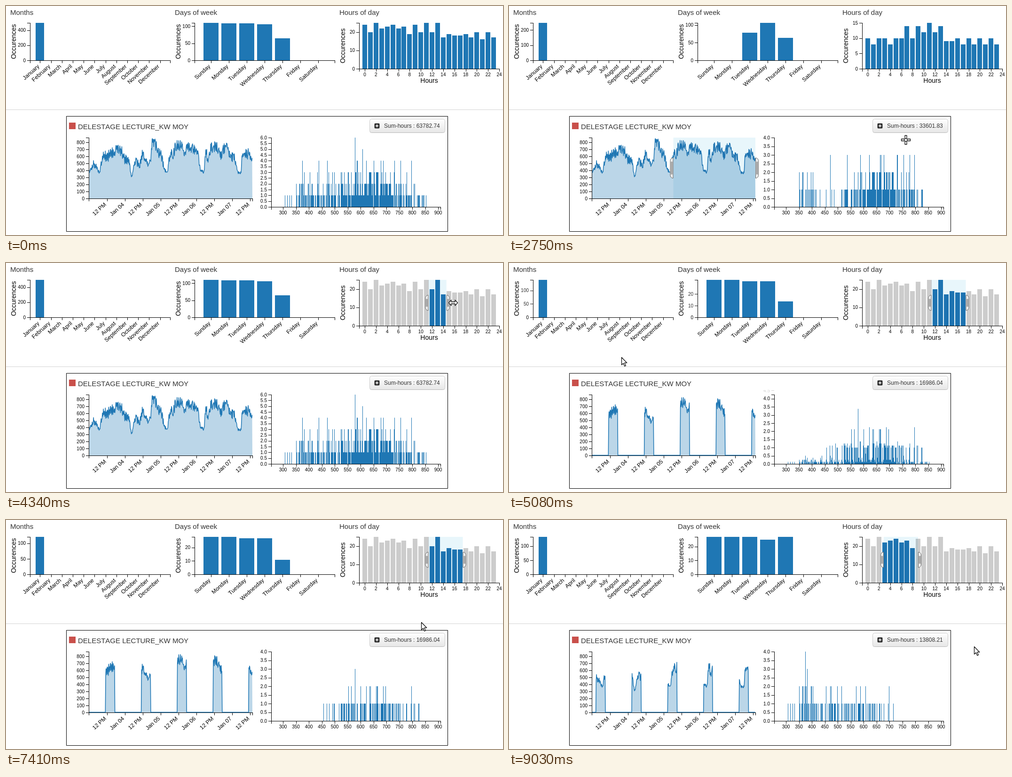
These frames come from a looping animation (1057x489 px, 9050 ms). An HTML page with a canvas:

```html
<!DOCTYPE html>
<html lang="en">
<head>
<meta charset="utf-8">
<title>Load dashboard</title>
<style>
html, body { margin: 0; width: 100%; height: 100%; overflow: hidden; background: #fff; }
canvas { display: block; }
</style>
</head>
<body>
<canvas id="stage" width="1057" height="489"></canvas>
<script>
const ctx = document.getElementById('stage').getContext('2d');
const LOOP = 9050, FADE = 500, DAY_PX = 76.1;
const BLUE = '#1f77b4', GREY = '#ccc', INK = '#333';
const FONT = '"Liberation Sans", Arial, sans-serif';
const MONTHS = ['January', 'February', 'March', 'April', 'May', 'June', 'July',
  'August', 'September', 'October', 'November', 'December'];
const DAYS = ['Sunday', 'Monday', 'Tuesday', 'Wednesday', 'Thursday', 'Friday', 'Saturday'];

const lerp = (a, b, k) => a + (b - a) * k;
const clamp = (v, lo, hi) => Math.max(lo, Math.min(hi, v));
const cubicInOut = k => k < .5 ? 4 * k ** 3 : 1 - 4 * (1 - k) ** 3;
const range = (from, to, step) =>
  Array.from({ length: Math.floor((to - from) / step + 1e-6) + 1 }, (_, i) => from + i * step);

function random(seed) {
  return () => {
    seed = seed + 0x6D2B79F5 | 0;
    let r = Math.imul(seed ^ seed >>> 15, 1 | seed);
    r = r + Math.imul(r ^ r >>> 7, 61 | r) ^ r;
    return ((r ^ r >>> 14) >>> 0) / 4294967296;
  };
}

// Values between [time, ...values] key points.
function between(keys, t) {
  const next = keys.findIndex(p => p[0] > t);
  if (next <= 0) return keys[next ? keys.length - 1 : 0].slice(1);
  const a = keys[next - 1], b = keys[next], k = (t - a[0]) / (b[0] - a[0]);
  return a.slice(1).map((v, i) => lerp(v, b[i + 1], k));
}

// Turning points of the load curve, in pixels; fine noise goes on top.
const TURNS = [
  [177, 355], [186, 338], [192, 344], [199, 357], [205, 320], [215, 322], [229, 311], [235, 306],
  [247, 310], [249, 325], [262, 333], [267, 366], [270, 356], [273, 330], [284, 340], [291, 315],
  [302, 342], [308, 328], [311, 286], [316, 290], [323, 310], [331, 320], [337, 350], [343, 356],
  [350, 310], [355, 326], [360, 299], [375, 297], [379, 324], [385, 299], [408, 313], [414, 352],
  [421, 355], [425, 310], [430, 328], [435, 303], [447, 299], [457, 320], [466, 300], [486, 327],
  [494, 357], [500, 355], [502, 318], [516, 315], [524, 326]];
const noise = random(5);
const SERIES = range(177, 524, .7).map(x => {
  const [y] = between(TURNS, x), swing = clamp((362 - y) * .35, 3, 12);
  return [x, 282 + Math.abs(y + (noise() * 2 - 1) * swing - 282)];
});

const hourMask = start => x => x >= start && (x - start) % DAY_PX <= 19.4;

// How often each load value occurs among the kept samples.
function histogram(keep, max) {
  const counts = {};
  for (const [x, y] of SERIES) {
    const v = Math.round((411 - y) / .15);
    if (keep(x)) counts[v] = Math.min(max, (counts[v] || 0) + 1);
  }
  return counts;
}

function scale(max, count) {
  const raw = max / count, base = 10 ** Math.floor(Math.log10(raw)), err = base / raw;
  const step = base * (err <= .15 ? 10 : err <= .35 ? 5 : err <= .75 ? 2 : 1);
  return { max, ticks: range(0, max, step) };
}

function state(sum, days, hours, histMax, keep, mask) {
  return {
    sum, days, hours, mask,
    hist: histogram(keep, histMax),
    monthScale: scale(days.reduce((a, b) => a + b), 3),
    dayScale: scale(Math.max(...days), 3),
    hourScale: scale(Math.max(...hours), 3),
    histScale: scale(histMax, 10)
  };
}

const HOURS = [24, 20, 25, 22, 23, 24, 22, 23, 19, 24, 20, 25, 20, 25, 17, 19, 18, 18, 19, 17, 20, 16, 20, 17];
const LATE_HOURS = [10, 8, 10, 10, 8, 10, 10, 14, 10, 14, 12, 15, 12, 14, 9, 9, 10, 8, 10, 8, 10, 8, 10, 8];
const inNoon = hourMask(212), inDawn = hourMask(185.4);
const all = state('63782.74', [110, 108, 108, 106, 65], HOURS, 6, () => true);
const late = state('33601.83', [0, 0, 78, 106, 64], LATE_HOURS, 4, x => x > 349.5);
const noon = state('16986.04', [28, 28, 27, 27, 11], HOURS, 4, inNoon, inNoon);
const dawn = state('13808.21', [27, 27, 27, 25, 27], HOURS, 4, inDawn, inDawn);
const CHANGES = [[-FADE, all], [2010, late], [3240, all], [4758, noon], [8510, dawn]];

const PATH = [
  [260, 905, 238], [600, 760, 290], [1150, 439, 333], [1310, 378, 350], [1390, 349, 346],
  [1760, 656, 330], [2010, 656, 330], [2400, 850, 300], [2790, 843, 284], [2910, 252, 338],
  [3240, 243, 339], [4140, 890, 88], [4340, 951, 85], [4500, 985, 90], [5080, 239, 201],
  [5960, 606, 355], [6050, 606, 355], [6640, 860, 193], [6920, 859, 308], [7120, 963, 297],
  [7410, 883, 218], [7740, 883, 218], [7920, 930, 99], [8140, 930, 99], [8260, 828.5, 99],
  [9030, 989, 270]];
const pointer = t => between(PATH, t);

function lineBrush(t) {
  if (t < 1390 || t >= 2910) return null;
  return [349.5, t < 1760 ? clamp(pointer(t)[0], 349.5, 524) : 524];
}

function hourBrush(t) {
  if (t < 4180) return null;
  if (t < 4500) return [898.5, clamp(pointer(t - 48)[0], 898.5, 971.5)];
  const dx = t < 8140 ? 0 : t < 8260 ? pointer(t)[0] - 930 : -101.5;
  return [898.5 + dx, 971.5 + dx];
}

function box(x, y, w, h, color) {
  ctx.fillStyle = color;
  ctx.fillRect(x, y, w, h);
}

function bar(x, base, w, h, color = BLUE) {
  const left = Math.round(x), top = Math.round(base - h);
  box(left, top, Math.round(x + w) - left, base - top, color);
}

function text(str, x, y, size, align = 'left', color = '#000', angle = 0) {
  ctx.save();
  ctx.translate(x, y);
  ctx.rotate(angle * Math.PI / 180);
  ctx.font = size + 'px ' + FONT;
  ctx.fontKerning = 'none';
  ctx.textAlign = align;
  ctx.fillStyle = color;
  ctx.fillText(str, 0, 0);
  ctx.restore();
}

function yAxis(x, top, bottom, from, to, k, label = String) {
  const height = bottom - top;
  box(x, top, 1, height + 1, '#000');
  box(x - 6, top, 6, 1, '#000');
  box(x - 6, bottom, 6, 1, '#000');
  ctx.save();
  ctx.beginPath();
  ctx.rect(x - 45, top - 10, 60, height + 30);
  ctx.clip();
  for (const v of new Set([...from.ticks, ...to.ticks])) {
    const y = bottom - height * lerp(v / from.max, v / to.max, k);
    ctx.globalAlpha = lerp(+from.ticks.includes(v), +to.ticks.includes(v), k);
    box(x - 6, Math.round(y), 6, 1, '#000');
    text(label(v), x - 9, y + 3.6, 10, 'right');
  }
  ctx.restore();
}

function xAxis(x0, x1, y, ticks) {
  box(x0, y, x1 - x0 + 1, 1, '#000');
  for (const x of [x0, x1, ...ticks]) box(Math.round(x), y, 1, 6, '#000');
}

const title = (str, x, y) => text(str, x, y, 15, 'left', INK);
const slanted = (str, x, y) => text(str, x - .5, y + 14, 12, 'right', '#000', -42);
const sideTitle = (x, y) => text('Occurences', x, y, 14, 'center', '#000', -90);

function handle(x, top, height, east) {
  const s = east ? 1 : -1, e = +east, a = height / 3, b = 2 * a;
  const p = new Path2D(
    `M${.5 * s},${a}A6,6 0 0 ${e} ${6.5 * s},${a + 6}V${b - 6}A6,6 0 0 ${e} ${.5 * s},${b}Z` +
    `M${2.5 * s},${a + 8}V${b - 8}M${4.5 * s},${a + 8}V${b - 8}`);
  ctx.save();
  ctx.translate(x, top);
  ctx.fillStyle = '#eee';
  ctx.strokeStyle = '#666';
  ctx.lineWidth = 1;
  ctx.fill(p);
  ctx.stroke(p);
  ctx.restore();
}

function drawBrush(extent, top, height) {
  if (!extent) return;
  const [a, b] = extent;
  ctx.globalCompositeOperation = 'multiply';
  box(a, top, b - a, height, '#e8f6fb');
  ctx.globalCompositeOperation = 'source-over';
  handle(a, top, height, false);
  handle(b, top, height, true);
}

function drawMonths(from, to, k) {
  const centers = MONTHS.map((_, i) => 72.3 + 23.2 * i);
  title('Months', 9, 19);
  sideTitle(21, 76);
  bar(62.6, 116, 18.8, 80);
  xAxis(51, 349, 116, centers);
  MONTHS.forEach((m, i) => slanted(m, centers[i], 116));
  yAxis(51, 36, 116, from.monthScale, to.monthScale, k);
}

function drawDays(from, to, k) {
  const centers = DAYS.map((_, i) => 436 + 38 * i);
  const share = (s, i) => (s.days[i] || 0) / s.dayScale.max;
  title('Days of week', 359, 19);
  sideTitle(371, 76);
  DAYS.forEach((d, i) => {
    bar(centers[i] - 16, 116, 32, 80 * lerp(share(from, i), share(to, i), k));
    slanted(d, centers[i], 116);
  });
  xAxis(401, 699, 116, centers);
  yAxis(401, 36, 116, from.dayScale, to.dayScale, k);
}

function drawHours(from, to, k, extent) {
  const xOf = h => 763 + 11.92 * h;
  const share = (s, i) => s.hours[i] / s.hourScale.max;
  title('Hours of day', 709, 19);
  sideTitle(721, 85);
  for (let i = 0; i < 24; i++) {
    const x = xOf(i), chosen = !extent || (x >= extent[0] && x < extent[1]);
    bar(x - 5, 134, 10, 98 * lerp(share(from, i), share(to, i), k), chosen ? BLUE : GREY);
  }
  const ticks = range(0, 24, 2);
  xAxis(751, 1049, 134, ticks.map(xOf));
  for (const h of ticks) text(h, xOf(h), 150, 10, 'center');
  text('Hours', 900, 164, 14, 'center');
  yAxis(751, 36, 134, from.hourScale, to.hourScale, k);
  drawBrush(extent, 36, 98);
}

function drawLoad(mask, extent) {
  const ticks = range(0, 8, 1).map(i => 214.5 + DAY_PX / 2 * i);
  const loads = scale(867, 10);
  xAxis(176, 524, 411, ticks);
  ticks.forEach((x, i) => slanted(i % 2 ? 'Jan 0' + (4 + (i - 1) / 2) : '12 PM', x, 411));
  yAxis(176, 281, 411, loads, loads, 1);

  const line = new Path2D();
  for (const [x, y] of SERIES) line.lineTo(x, mask && !mask(x) ? 410.6 : y);
  const area = new Path2D(line);
  area.lineTo(524, 411);
  area.lineTo(177, 411);
  ctx.fillStyle = 'rgba(31,119,180,.3)';
  ctx.fill(area);
  ctx.strokeStyle = BLUE;
  ctx.lineWidth = 1.5;
  ctx.lineJoin = 'round';
  ctx.stroke(line);
  drawBrush(extent, 281, 130);
}

function drawHist(from, to, k) {
  const xOf = v => 589 + (v - 300) * .55;
  const share = (s, v) => (s.hist[v] || 0) / s.histScale.max;
  for (let v = 260; v < 900; v++) {
    const h = 148 * lerp(share(from, v), share(to, v), k);
    if (h > 0) box(Math.round(xOf(v)), 429 - h, 1, h, BLUE);
  }
  const ticks = range(300, 900, 50);
  xAxis(564, 924, 429, ticks.map(xOf));
  for (const v of ticks) text(v, xOf(v), 445, 10, 'center');
  yAxis(564, 281, 429, from.histScale, to.histScale, k, v => v.toFixed(1));
}

function drawButton(sum, hover) {
  const fill = ctx.createLinearGradient(0, 241, 0, 271);
  fill.addColorStop(0, hover ? '#e6e6e6' : '#fff');
  fill.addColorStop(1, '#e6e6e6');
  const rim = ctx.createLinearGradient(0, 241, 0, 271);
  rim.addColorStop(.9, '#ccc');
  rim.addColorStop(1, '#b3b3b3');
  ctx.beginPath();
  ctx.roundRect(773.5, 241.5, 160, 29, 4);
  ctx.fillStyle = fill;
  ctx.fill();
  ctx.strokeStyle = rim;
  ctx.lineWidth = 1;
  ctx.stroke();
  ctx.beginPath();
  ctx.roundRect(783.5, 250.5, 11, 11, 2);
  ctx.fillStyle = INK;
  ctx.fill();
  box(786, 255.2, 6, 1.6, '#fff');
  box(788.2, 253, 1.6, 6, '#fff');
  text('Sum-hours : ' + sum, 804, 260, 12, 'left', INK);
}

const ARROW = new Path2D('M.5,.5V16.5L4.2,13.2L6.8,19.3L9.4,18.2L6.8,12.2H11.8Z');
const CROSS = new Path2D('M-2,-9.5H2V-3H-2ZM-2,3H2V9.5H-2ZM-9.5,-2H-3V2H-9.5ZM3,-2H9.5V2H3Z');
const RESIZE = new Path2D('M-9.5,0L-4,-6V-2H4V-6L9.5,0L4,6V2H-4V6Z');
const MOVE = new Path2D('M0,-10L4,-6H1.5V-1.5H6V-4L10,0L6,4V1.5H1.5V6H4L0,10L-4,6H-1.5V1.5H-6V4L-10,0L-6,-4V-1.5H-1.5V-6H-4Z');
const HAND = new Path2D('M-1.5,1Q0,-1 1.5,1V7L8,8.5Q10,9 9.5,12L8,19H-1L-6,12Q-5,9.5 -1.5,12Z');

const within = (x, y, l, t, r, b) => x >= l && x <= r && y >= t && y <= b;
const onButton = (x, y) => within(x, y, 773, 241, 934, 271);

function cursorShape(t, x, y, extent) {
  if (t >= 1390 && t < 1760) return CROSS;
  if (t >= 4180 && t < 4500) return RESIZE;
  if (t >= 8140 && t < 8260) return MOVE;
  if (onButton(x, y)) return HAND;
  if (within(x, y, 177, 281, 524, 411) || within(x, y, 564, 281, 924, 429)) return CROSS;
  if (within(x, y, 751, 36, 1049, 134)) {
    if (!extent) return CROSS;
    if (Math.min(Math.abs(x - extent[0]), Math.abs(x - extent[1])) < 6) return RESIZE;
    return x > extent[0] && x < extent[1] ? MOVE : CROSS;
  }
  return ARROW;
}

function drawCursor(shape, x, y) {
  ctx.save();
  ctx.translate(Math.round(x), Math.round(y));
  ctx.fillStyle = '#fff';
  ctx.strokeStyle = '#111';
  ctx.lineWidth = 1.3;
  ctx.lineJoin = 'round';
  ctx.fill(shape);
  ctx.stroke(shape);
  ctx.restore();
}

function draw(t) {
  const at = CHANGES.filter(c => c[0] <= t).length - 1;
  const [start, to] = CHANGES[at];
  const from = at ? CHANGES[at - 1][1] : to;
  const k = cubicInOut(clamp((t - start) / FADE, 0, 1));
  const extent = hourBrush(t), [x, y] = pointer(t), shown = t >= 260;

  box(0, 0, 1057, 489, '#fff');
  drawMonths(from, to, k);
  drawDays(from, to, k);
  drawHours(from, to, k, extent);

  box(0, 221, 1057, 1, '#d3d3d3');
  ctx.strokeStyle = '#000';
  ctx.lineWidth = 1;
  ctx.strokeRect(128.5, 235.5, 811, 246);
  box(134, 249, 14, 14, '#c9504b');
  title('DELESTAGE LECTURE_KW MOY', 153, 263);
  drawButton(to.sum, shown && onButton(x, y));
  drawLoad(to.mask, lineBrush(t));
  drawHist(from, to, k);
  if (shown) drawCursor(cursorShape(t, x, y, extent), x, y);
}

const began = performance.now();
function frame() {
  draw((performance.now() - began) % LOOP);
  requestAnimationFrame(frame);
}
frame();
</script>
</body>
</html>
```
